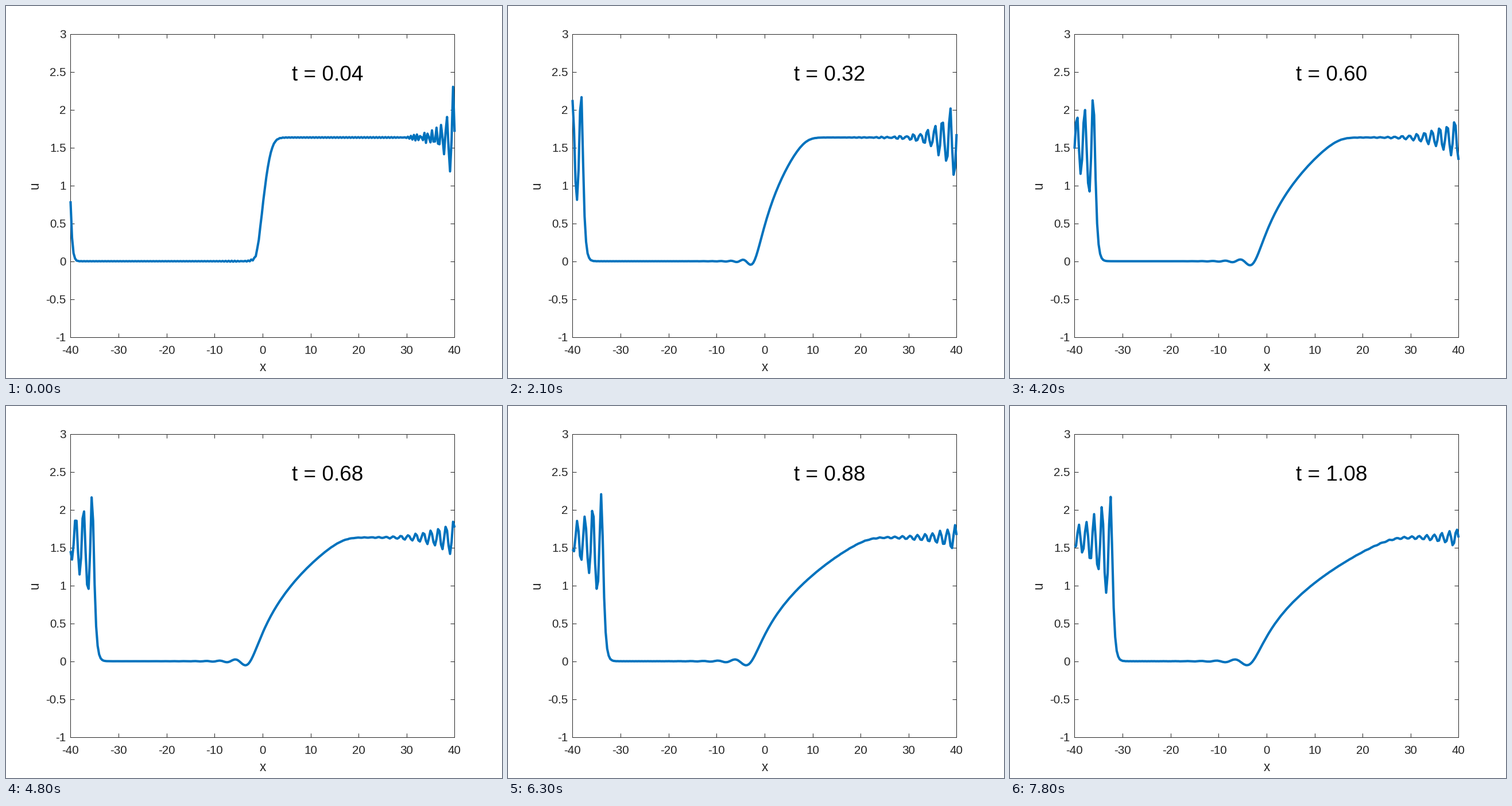
A matplotlib script that plays this animation: 864x648 px, repeating every 8000 ms.

```python
import numpy as np
import matplotlib.pyplot as plt
from matplotlib.animation import FuncAnimation

W, H, DPI = 864, 648, 144
LEFT, RIGHT, TOP, BOTTOM = 112.4, 781.4, 48.6, 576.6
INK, BLUE = "#262626", "#0072BD"
FRAME_MS, LOOP_MS, HOLD = 100, 8000, 3
T_STEP, DT = 0.04, 0.0002

# Modified KdV-Burgers: u_t + FLUX (u^3)_x + MU u_xxx = NU u_xx, periodic
N, LENGTH = 256, 80.0
FLUX, MU, NU = 2.8, 0.915, 0.4
PLATEAU = np.sqrt(8 / 3)


def solve(count):
    """Integrating-factor RK4; returns x and one profile per T_STEP."""
    x = np.linspace(-40, 40, N)
    k = 2 * np.pi / LENGTH * np.arange(N // 2 + 1)
    odd = k.copy()
    odd[-1] = 0
    half = np.exp((1j * MU * odd**3 - NU * k**2) * DT / 2)
    full = half**2
    v = np.fft.rfft(PLATEAU / 2 * (1 + np.tanh(x)))

    def slope(w):
        return -1j * odd * FLUX * DT * np.fft.rfft(np.fft.irfft(w, N) ** 3)

    profiles = []
    for _ in range(count):
        for _ in range(round(T_STEP / DT)):
            a = slope(v)
            b = slope(half * (v + a / 2))
            c = slope(half * v + b / 2)
            d = slope(full * v + half * c)
            v = full * v + (full * a + 2 * half * (b + c) + d) / 6
        profiles.append(np.fft.irfft(v, N))
    return x, profiles


plt.rcParams["font.family"] = "Liberation Sans"
fig = plt.figure(figsize=(W / DPI, H / DPI), dpi=DPI, facecolor="white")
ax = fig.add_axes([LEFT / W, 1 - BOTTOM / H, (RIGHT - LEFT) / W, (BOTTOM - TOP) / H])
ax.set(xlim=(-40, 40), ylim=(-1, 3))
x_ticks = np.arange(-40, 41, 10)
y_ticks = np.arange(-1, 3.1, 0.5)
ax.set_xticks(x_ticks)
ax.set_yticks(y_ticks)
ax.tick_params(direction="in", length=3.35, width=0.5, color=INK,
               top=True, right=True, labelbottom=False, labelleft=False)
for spine in ax.spines.values():
    spine.set(linewidth=0.5, edgecolor=INK)


def label(px, py, text, size, color=INK, ha="center", rotation=0):
    """Text with its baseline at a pixel position measured from the top left."""
    return fig.text(px / W, 1 - py / H, text, fontsize=size, color=color,
                    ha=ha, va="baseline", rotation=rotation,
                    rotation_mode="anchor")


for tick in x_ticks:
    label(LEFT + (tick + 40) * (RIGHT - LEFT) / 80, 606, f"{tick}", 10.3)
for tick in y_ticks:
    label(104.5, BOTTOM - (tick + 1) * (BOTTOM - TOP) / 4 + 7.6, f"{tick:g}",
          10.3, ha="right")
label(447, 636, "x", 11.3)
label(56, 312.5, "u", 11.3, rotation=90)
clock = label(497.5, 130, "", 18.5, color="black", ha="left")

xs, profiles = solve(-(-LOOP_MS // (FRAME_MS * HOLD)))
curve, = ax.plot(xs, profiles[0], color=BLUE, linewidth=2.05, zorder=5,
                 clip_on=False, solid_joinstyle="round", solid_capstyle="butt")


def update(frame):
    step = frame // HOLD
    curve.set_ydata(profiles[step])
    clock.set_text(f"t = {(step + 1) * T_STEP:.2f}")
    return curve, clock


anim = FuncAnimation(fig, update, frames=LOOP_MS // FRAME_MS,
                     interval=FRAME_MS, repeat=True, repeat_delay=0)
plt.show()
```
